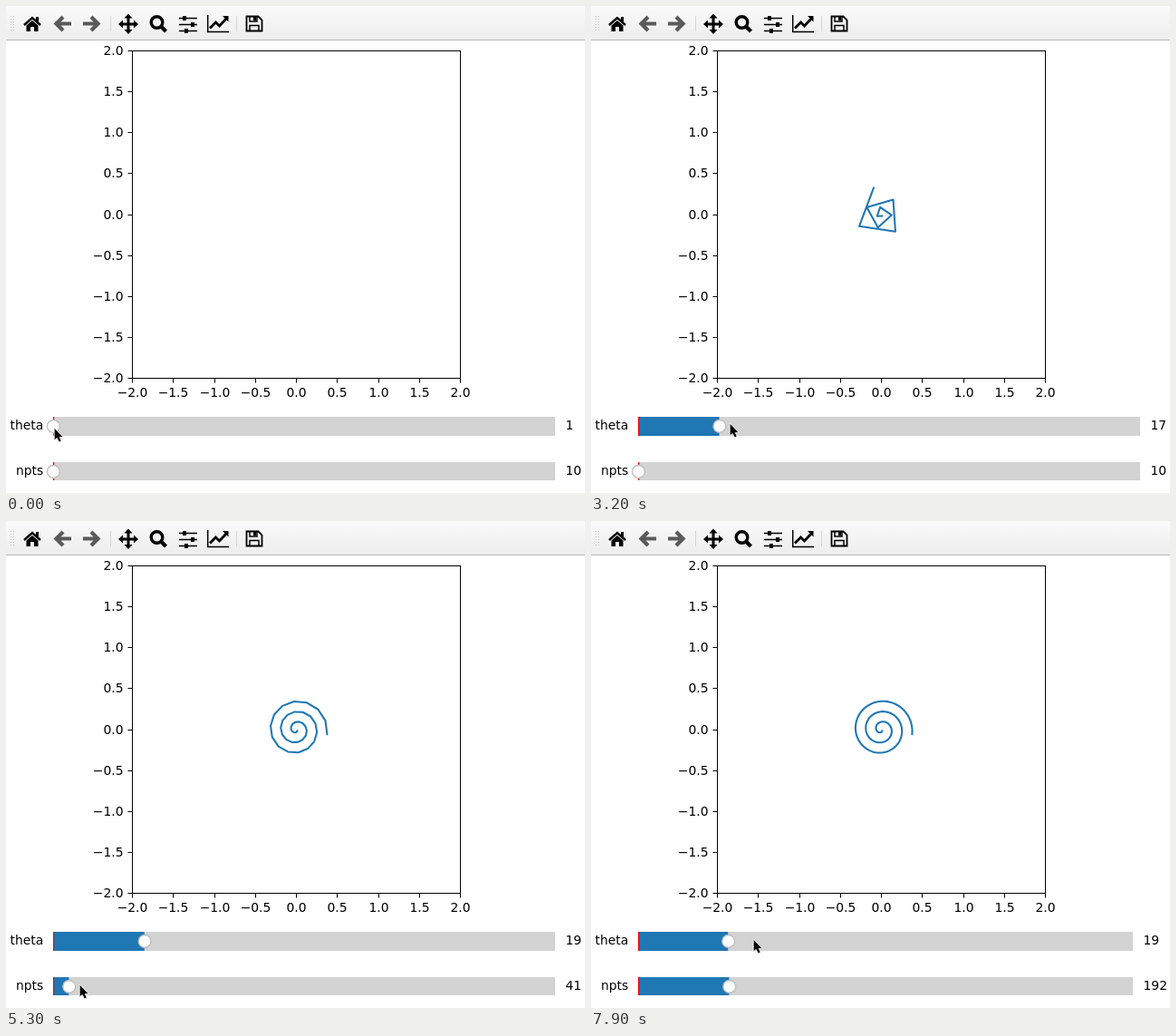
An HTML page for the animation above (8 s loop, 639 by 537 pixels).

```html
<!DOCTYPE html>
<html lang="en">
<head>
<meta charset="utf-8">
<title>Spiral with sliders</title>
<style>
  html, body { margin: 0; width: 100%; height: 100%; overflow: hidden; background: #fff; }
  svg { display: block; }
  text { font: 13.89px "DejaVu Sans", sans-serif; }
  .end { text-anchor: end; }
  .mid { text-anchor: middle; }
  .line { fill: none; stroke: #000; }
</style>
</head>
<body>
<svg width="639" height="537" viewBox="0 0 639 537">
  <defs>
    <linearGradient id="bar" x2="0" y2="1">
      <stop stop-color="#fafafa"/><stop offset="1" stop-color="#ededed"/>
    </linearGradient>
    <path id="arrow" d="M61.5 10.5L64.5 13.5L60.5 17.5H72V21.5H60.5L64.5 25.5L61.5 28.5L52.5 19.5Z" fill="#5a5a5a"/>
  </defs>

  <!-- toolbar -->
  <rect width="639" height="37" fill="url(#bar)"/>
  <path d="M0 37.5H639" stroke="#b8b8b8"/>
  <path d="M5.5 11V28M8.5 11V28" stroke="#c4c4c4" stroke-dasharray="1 2"/>
  <path d="M115.5 11V28M254.5 11V28" stroke="#d6d6d6"/>
  <path d="M20 21L29 13L38 21" class="line" stroke-width="2.4"/>
  <path d="M22.5 21.5L29 16L35.5 21.5V28H31V23H27V28H22.5ZM33 12H36V18L33 16Z"/>
  <use href="#arrow"/>
  <use href="#arrow" transform="matrix(-1 0 0 1 157 0)"/>
  <path d="M135 11V29M126 20H144" class="line" stroke-width="3"/>
  <path d="M135 8.5L139.5 13.5H130.5ZM135 31L139.5 26H130.5ZM124 20L129 15.5V24.5ZM146 20L141 15.5V24.5Z"/>
  <circle cx="166.5" cy="18" r="6.3" class="line" stroke-width="3.4"/>
  <path d="M171 22.5L176.5 28" class="line" stroke-width="4.2"/>
  <path d="M191 13.5H211M191 20.5H211M191 27.5H211" class="line" stroke-width="1.6"/>
  <path d="M195 11H199V16H195ZM204 18H208V23H204ZM197 25H201V30H197Z"/>
  <path d="M222.7 10V28.5H246" class="line" stroke-width="1.5"/>
  <path d="M225 24.5L231.5 18L235.5 22L243 14" class="line" stroke-width="2.8"/>
  <path d="M239 11H245.5V17.5Z"/>
  <path d="M265.5 11.5H278.5L282.5 15.5V27.5H265.5Z" class="line" stroke-width="1.8"/>
  <path d="M269 27V21.5H279V27M269 12V17H277V12" class="line" stroke-width="1.5"/>
  <path d="M273 12H276V16H273Z"/>

  <!-- plot -->
  <path id="spiral" fill="none" stroke="#1f77b4" stroke-width="2.08" stroke-linejoin="round" stroke-linecap="square"/>
  <rect x="139.5" y="49.5" width="362" height="361" class="line"/>
  <g id="ticks"></g>

  <g id="sliders"></g>

  <g id="pointer">
    <path d="M0 -1.5V12.5L3 10L5.4 14.5L8 13.2L6 9H10Z" transform="translate(.2 .4)" stroke="#fff" stroke-width=".8"/>
  </g>
  <g id="watch" stroke="#000">
    <path d="M-4.5 -7.5H4.5V-5H-4.5ZM-4.5 5H4.5V7.5H-4.5Z"/>
    <path d="M-4 -5.5H4L7 -2V2L4 5.5H-4L-7 2V-2Z" fill="#fff" stroke-width="1.8"/>
    <path d="M7.5 -1.5V1.5" stroke-width="2"/>
    <path d="M.5 -3.5V0L-3 2.5M.5 0L3 1.5" fill="none" stroke-width="1.2"/>
  </g>
</svg>
<script>
const byId = id => document.getElementById(id);

function add(parent, tag, attrs, text = "") {
  const node = document.createElementNS("http://www.w3.org/2000/svg", tag);
  setAttrs(node, attrs);
  node.textContent = text;
  return parent.appendChild(node);
}

function setAttrs(node, attrs) {
  for (const name in attrs) node.setAttribute(name, attrs[name]);
}

for (let i = 0; i <= 8; i++) {
  const value = i / 2 - 2;
  const label = value.toFixed(1).replace("-", "−");
  const x = Math.round(139 + i * 45.25) + .5;
  const y = Math.round(410 - i * 45.125) + .5;
  add(byId("ticks"), "path", { d: `M${x} 411v4.5M139 ${y}h-4.5`, class: "line" });
  add(byId("ticks"), "text", { x, y: 431, class: "mid" }, label);
  add(byId("ticks"), "text", { x: 129.5, y: y + 4.8, class: "end" }, label);
}

const RAIL_X = 52;

function makeSlider(name, top, height, min, max) {
  const group = byId("sliders");
  const rect = fill => add(group, "rect", { x: RAIL_X, y: top, height, fill });
  add(group, "text", { x: 41.3, y: top + 14, class: "end" }, name);
  const rail = rect("#d3d3d3");
  const filled = rect("#1f77b4");
  add(group, "path", { d: `M52.6 ${top}v${height}`, stroke: "#f00", "stroke-width": 1.3 });
  const knob = add(group, "circle", { cy: top + 10.4, r: 6.95, fill: "#fff", stroke: "#bfbfbf", "stroke-width": 1.39 });
  const label = add(group, "text", { y: top + 14 });
  return (value, width) => {
    const length = (value - min) / (max - min) * width;
    setAttrs(rail, { width });
    setAttrs(filled, { width: length });
    setAttrs(knob, { cx: RAIL_X + .4 + length });
    setAttrs(label, { x: RAIL_X + width + 11.5 });
    label.textContent = value;
  };
}

const setTheta = makeSlider("theta", 453, 21, 1, 100);
const setCount = makeSlider("npts", 503, 20, 10, 1000);

// Keys are [time in ms, value]; values between keys are linear.
const thetaKeys = [[400, 1], [1200, 3], [1300, 4], [2100, 10], [2200, 10], [2400, 11], [2500, 11], [3200, 17], [3400, 19]];
const countKeys = [[4800, 10], [5500, 53], [5900, 85], [6400, 157], [6800, 192]];
const pointerX = [[400, 53], [1300, 73], [2200, 119], [2500, 121], [3200, 153], [3500, 153], [4400, 53],
  [4800, 53], [5500, 92], [5900, 113], [6400, 147], [6800, 152], [7200, 150], [7500, 150], [7900, 179]];
const pointerY = [[2500, 466], [3200, 461], [3400, 460], [3500, 460], [4400, 513], [5500, 512], [5900, 506],
  [6400, 504], [6800, 502], [7200, 454], [7500, 454], [7900, 462]];

function at(keys, t) {
  const next = keys.findIndex(key => key[0] > t);
  if (next === 0) return keys[0][1];
  if (next < 0) return keys[keys.length - 1][1];
  const [t0, a] = keys[next - 1], [t1, b] = keys[next];
  return a + (b - a) * (t - t0) / (t1 - t0);
}

function spiralPath(theta, count) {
  if (theta === 1) return "";
  const points = Array.from({ length: count }, (_, i) => {
    const angle = 1 + (theta - 1) * i / (count - 1);
    const radius = .02 * angle;
    const x = 320.4 + 90.5 * radius * Math.cos(angle);
    const y = 230 + 90.25 * radius * Math.sin(angle);
    return x.toFixed(2) + " " + y.toFixed(2);
  });
  return "M" + points.join("L");
}

function render(t) {
  const theta = Math.round(at(thetaKeys, t));
  const count = Math.round(at(countKeys, t));
  const width = count < 100 ? 554 : 546;
  setTheta(theta, width);
  setCount(count, width);
  setAttrs(byId("spiral"), { d: spiralPath(theta, count) });

  const x = Math.round(at(pointerX, t)), y = Math.round(at(pointerY, t));
  const busy = [400, 4700].some(start => t >= start && t < start + 200);
  setAttrs(byId("pointer"), { transform: `translate(${x} ${y})`, visibility: busy ? "hidden" : "visible" });
  setAttrs(byId("watch"), { transform: `translate(${x - 3.5} ${y})`, visibility: busy ? "visible" : "hidden" });
}

function tick() {
  render(Math.floor(performance.now() % 8000 / 100) * 100);
  requestAnimationFrame(tick);
}
tick();
</script>
</body>
</html>
```
